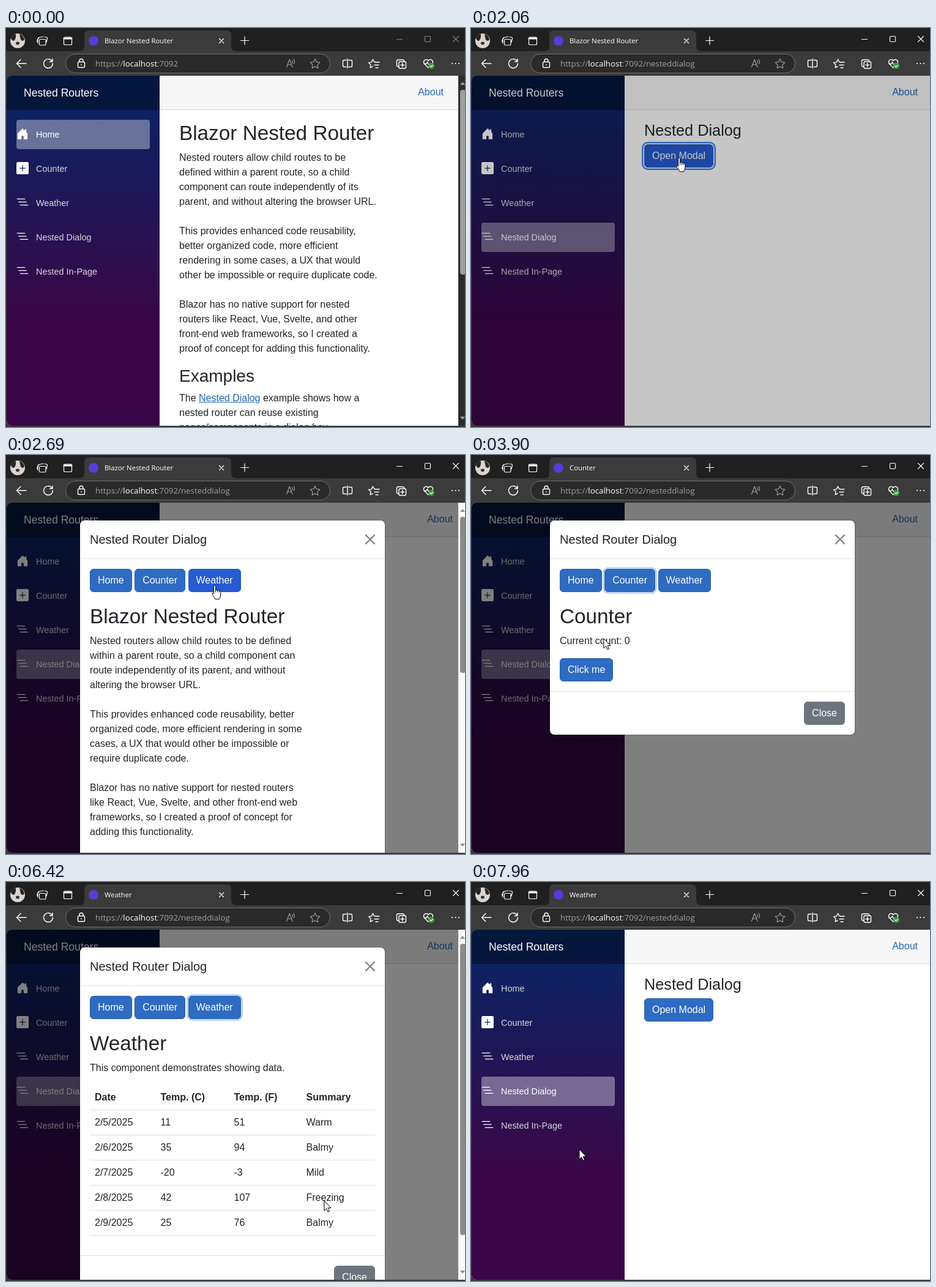
Write an HTML page that moves like this. It is 750 by 652 pixels and loops after 8 s.

```html
<!DOCTYPE html>
<html lang="en">
<head>
<meta charset="utf-8">
<title>Nested router demo</title>
<style>
* { box-sizing: border-box; }
html, body { margin: 0; width: 100%; height: 100%; overflow: hidden; background: #383838; }
body { position: relative; font: 16px/24px "Liberation Sans", Arial, sans-serif; color: #212529; }
[hidden] { display: none !important; }
h1, h2, h3, p { margin: 0; font-weight: 400; }
h1 { font-size: 33.3px; line-height: 1.2; margin-bottom: 8px; }
h2 { font-size: 28px; line-height: 1.2; margin: 16px 0 8px; }
h3 { font-size: 25.3px; line-height: 1.2; margin-bottom: 8px; }
p { white-space: pre; margin-bottom: 16px; }
a { color: #2265b2; }
#chrome { position: absolute; left: 0; top: 0; font-family: "Open Sans", "Noto Sans", sans-serif; }
#page { position: absolute; left: 1px; top: 78px; width: 753px; height: 572px;
  background: #fff; border-radius: 8px 0 0 8px; overflow: hidden; }
#page > * { position: absolute; }

#side { left: 0; top: 0; width: 250px; height: 572px; background: linear-gradient(#052767, #3a0647 70%); }
.brand { height: 56px; padding-left: 28px; line-height: 56px; font-size: 17.6px; color: #fff;
  background: rgba(0,0,0,.4); margin-bottom: 16px; }
.nav { position: relative; width: 218px; height: 48px; margin: 0 16px 8px; padding-left: 32px; border-radius: 4px;
  font-size: 14.4px; line-height: 48px; color: #d7d7d7; }
.nav svg { position: absolute; left: 0; top: 13px; }
.nav.active { background: rgba(255,255,255,.37); color: #fff; }
.nav.lit { color: #fff; }
.nav.hover { background: rgba(255,255,255,.1); }
#top { left: 250px; right: 0; top: 0; height: 56px; background: #f7f7f7; border-bottom: 1px solid #d6d5d5; }
#about { position: absolute; right: 24px; top: 15px; color: #2265b2; }
.main { left: 282px; top: 73.6px; }

.btn { display: inline-block; height: 38px; padding: 6px 12px; border: 1px solid #2660ac; border-radius: 6px;
  background: #2e6bc2; color: #fff; vertical-align: middle; }
.btn.hover { background: #275bd2; border-color: #2456c6; }
.btn.grey { background: #6c757d; border-color: #6c757d; }
.btn.grey.hover { background: #5c636a; border-color: #565e64; }
.btn.focus { box-shadow: 0 0 0 1.6px #fff, 0 0 0 4px #3c86ee; }
#modal .row .focus, #click.focus { box-shadow: 0 0 0 1px #e6f0fc, 0 0 0 2.6px #a5c6f2; }

#backdrop { inset: 0; background: #000; }
#modal { inset: 0; }
#dialog { position: absolute; top: 28px; width: 500px; background: #fff; background-clip: padding-box;
  border: 1px solid rgba(0,0,0,.175); border-radius: 8px; }
.head { position: relative; height: 63px; padding: 16px; border-bottom: 1px solid #dee2e6; font-size: 20px; line-height: 30px; }
.head svg { position: absolute; right: 16px; top: 23px; }
.body { padding: 16px; }
.row { height: 38px; margin-bottom: 20px; white-space: nowrap; }
.foot { height: 71px; padding: 16px; border-top: 1px solid #dee2e6; text-align: right; }
.line { display: grid; grid-template-columns: 107.5px 120px 118px 1fr; height: 41px; padding: 8px; border-bottom: 1px solid #dee2e6; }
.line:first-child { font-weight: 700; }
.table { margin-bottom: 16px; }

.bar { position: absolute; left: 738px; top: 0; width: 15px; height: 572px; background: #fafafa; color: #8b8b8b; }
.bar.dark { background: #2c2c2c; color: #9f9f9f; }
.bar i { position: absolute; left: 3px; top: 23px; width: 9px; border-radius: 4px; background: currentColor; }
.bar::before, .bar::after { content: ""; position: absolute; left: 3px; top: 10px; border: 4.5px solid transparent;
  border-top: 0; border-bottom: 5px solid currentColor; }
.bar::after { top: 557px; transform: scaleY(-1); }
#status { left: 0; bottom: 0; height: 21px; width: 200px; padding-left: 5px; background: #1f1f1f; color: #fff;
  border-radius: 0 4px 0 0; font: 11.45px/20px "Open Sans", "Noto Sans", sans-serif; }
#pointer { position: absolute; left: 0; top: 0; overflow: visible; }
</style>
</head>
<body>
<svg id="chrome" width="750" height="78" fill="none" stroke="#fff" stroke-width="1.2" stroke-linecap="round" stroke-linejoin="round">
  <g stroke="none">
    <path fill="#202020" d="M0 0H750V38H0Z"/>
    <path fill="#3b3b3b" d="M0 38H120Q128 38 128 30V12Q128 4 136 4H360Q368 4 368 12V30Q368 38 376 38H750V78H0Z"/>
    <circle cx="19" cy="21" r="12" fill="#d9d4d0"/>
    <path fill="#2b2323" d="M8 16Q10 10 16 10Q17 17 13 21Q9 21 8 16ZM22 10Q29 12 30 19Q27 23 24 19Z"/>
    <ellipse cx="19" cy="25" rx="3" ry="2.4" fill="#3a3030"/>
    <circle cx="143" cy="21" r="8" fill="#5a3bd6"/>
  </g>
  <rect x="97.500" y="42.500" width="432" height="31" rx="15.500" fill="#2a2a2a" stroke="#707070" stroke-width="1"/>
  <path d="M56 18.500h7.500a1.500 1.500 0 0 1 1.500 1.500v6.500a1.500 1.500 0 0 1-1.500 1.500H56a1.500 1.500 0 0 1-1.500-1.500V20a1.500 1.500 0 0 1 1.500-1.500ZM52 25V18q0-2 2-2.500l7-1.500M66 23l1.500-6q.3-1.500-1.200-2L63 14.500M51 22.500q-.5-4 3-6.500"/>
  <rect x="94.500" y="15" width="13" height="12.500" rx="2"/><path d="M95 17H107" stroke-width="3"/>
  <path d="M348.500 17.500l7 7m0-7l-7 7M383.500 20.500h13M390 14v13"/>
  <g id="caption" stroke-width="1.1">
    <path d="M638.500 18.500h9M730.500 13.500l9 9m0-9l-9 9"/><rect x="684.500" y="13.500" width="9" height="9" rx="1.500"/>
  </g>
  <g stroke-width="1.4">
    <path d="M33 58H18m6-6.500l-6.500 6.500 6.500 6.500M75.500 54.500A7.400 7.400 0 1 0 76.400 58M76 50.500v4.500h-4.500"/>
    <rect x="117.500" y="55.500" width="11" height="9" rx="1.500"/><path d="M120 55v-1.500a3 3 0 0 1 6 0V55M123 59.500v1"/>
    <g stroke="#a5a5a5" stroke-width="1.100"><path d="M458.500 64l4.800-12.500 4.800 12.500M460 60h6.500M467.500 53q1.500 2 .5 4.500M470 51q2.500 3.500 .5 7.500"/>
    <path id="star" d="M505 50.500l2.400 5 5.400.8-3.900 3.800.9 5.400-4.800-2.500-4.800 2.500.9-5.400-3.900-3.800 5.400-.8Z"/></g>
    <path d="M556 52.500h-3.500q-2 0-2 2v7q0 2 2 2H556M560 52.500h3.500q2 0 2 2v7q0 2-2 2H560M558 50.500v15"/>
    <path d="M603 55.500l-1.500-.2-2-4-2.200 4.600-4.800.7 3.500 3.400-.8 4.900 4-2.100M603 56h7M602 60.500h7M604 65h4"/>
    <path d="M642 63h-1.500q-2 0-2-2v-7q0-2 2-2h8q2 0 2 2v.5"/><rect x="642" y="55" width="11.500" height="11" rx="2"/>
    <path d="M647.800 57.500v6m-3-3h6"/>
    <path d="M690 65l-6.500-6.500q-2-3 0-5.500 3.500-3 6.500.5 3-3.500 6.500-.5 2 2.500 0 5.500ZM683 58.500h4l1.500-3 2.500 5 1.500-2h4"/>
  </g>
  <circle cx="695" cy="62" r="5" fill="#3f9a45" stroke="none"/><path d="M692.800 62l1.700 1.700 3-3"/>
  <path d="M729 58h.01M734.500 58h.01M740 58h.01" stroke-width="2.200"/>
  <text id="title" x="161" y="25" font-size="11.300" fill="#fff" stroke="none"></text>
  <text x="146" y="63" font-size="13.300" fill="#a0a0a0" stroke="none">https://<tspan fill="#fff">localhost</tspan>:7092<tspan id="path">/nesteddialog</tspan></text>
</svg>

<div id="page">
  <div id="side"><div class="brand">Nested Routers</div></div>
  <div id="top"><span id="about">About</span></div>
  <div class="main" id="homePage"><h1>Blazor Nested Router</h1><p>Nested routers allow child routes to be
defined within a parent route, so a child
component can route independently of its
parent, and without altering the browser URL.

This provides enhanced code reusability,
better organized code, more efficient
rendering in some cases, a UX that would
other be impossible or require duplicate code.

Blazor has no native support for nested
routers like React, Vue, Svelte, and other
front-end web frameworks, so I created a
proof of concept for adding this functionality.</p><h2>Examples</h2><p>The <a style="text-decoration:underline">Nested Dialog</a> example shows how a
nested router can reuse existing
pages/components in a dialog box.</p></div>
  <div class="main" id="dialogPage"><h3>Nested Dialog</h3><span class="btn" id="open">Open Modal</span></div>
  <div class="bar dark" id="pageBar"><i style="height:302px"></i></div>
  <div id="backdrop"></div>
  <div id="modal">
    <div id="dialog">
      <div class="head">Nested Router Dialog<svg width="16" height="16"><path d="M1 1L15 15M15 1L1 15" stroke="#7d7d7d" stroke-width="2.200" stroke-linecap="round"/></svg></div>
      <div class="body">
        <div class="row"><span class="btn">Home</span> <span class="btn" id="counterBtn">Counter</span> <span class="btn" id="weatherBtn">Weather</span></div>
        <div id="homeView"><h1>Blazor Nested Router</h1><p>Nested routers allow child routes to be defined
within a parent route, so a child component can
route independently of its parent, and without
altering the browser URL.

This provides enhanced code reusability, better
organized code, more efficient rendering in some
cases, a UX that would other be impossible or
require duplicate code.

Blazor has no native support for nested routers
like React, Vue, Svelte, and other front-end web
frameworks, so I created a proof of concept for
adding this functionality.</p><h2>Examples</h2></div>
        <div id="counterView"><h1>Counter</h1><p>Current count: <span id="count"></span></p><span class="btn" id="click">Click me</span></div>
        <div id="weatherView"><h1>Weather</h1><p>This component demonstrates showing data.</p>
          <p id="loading" style="margin:0"><em>Loading...</em></p><div class="table" id="table"></div></div>
      </div>
      <div class="foot"><span class="btn grey" id="close">Close</span></div>
    </div>
    <div class="bar" id="modalBar"><i id="thumb"></i></div>
  </div>
  <div id="status">https://localhost:7092/nesteddialog</div>
</div>
<svg id="pointer" width="1" height="1">
  <circle id="ring" r="12" fill="#e6d200" opacity=".6"/>
  <g fill="#fff" stroke="#000" stroke-linejoin="round">
    <path id="arrow" d="M0 0V16L3.700 12.600 6.200 18.300 8.600 17.200 6.200 11.700H11.200Z"/>
    <g id="hand"><path d="M-1.500 1.500a1.500 1.500 0 0 1 3 0V8q1.500-1.500 3 .3 1.700-1 2.800.6 2.300-.5 2.500 1.500V15q0 4-2.300 7.500H1q-1.500-3.300-4-6-2-2.500-1-3.500 1.200-1 2.500.8Z"/><path d="M1.500 8v3.500M4.500 8.500v3M7.300 9v2.500" fill="none"/></g>
  </g>
</svg>

<script>
const $ = id => document.getElementById(id);
const show = (id, on) => { $(id).toggleAttribute("hidden", !on); };
const flag = (el, name, on) => el.classList.toggle(name, on);
const within = (t, a, b) => t >= a && t < b;
const ramp = (t, start, length) => Math.min(1, Math.max(0, (t - start) / length));
const easeOut = u => 1 - (1 - u) ** 1.7;
const smooth = u => u * u * (3 - 2 * u);

const icons = {
  home: '<path fill="#fff" d="M6.500 14.500V11a.5.5 0 0 1 .5-.5h2a.5.5 0 0 1 .5.5v3.500a.5.5 0 0 0 .5.5h4a.5.5 0 0 0 .5-.5v-7L13 5.800V2.500a.5.5 0 0 0-.5-.5h-1a.5.5 0 0 0-.5.5v1.300L8.350 1.150a.5.5 0 0 0-.7 0L1.500 7.500v7a.5.5 0 0 0 .5.5h4a.5.5 0 0 0 .5-.5Z"/>',
  plus: '<rect width="16" height="16" rx="2" fill="#fff"/><path d="M4.500 8h7M8 4.500v7" stroke="#22205a" stroke-linecap="round"/>',
  list: '<path d="M1 3.500h10M3 7.500h10M5 11.500h10" stroke="#fff" stroke-linecap="round"/>'
};
const links = [["Home", "home"], ["Counter", "plus"], ["Weather", "list"], ["Nested Dialog", "list"], ["Nested In-Page", "list"]];
$("side").innerHTML += links.map(([text, icon]) =>
  `<div class="nav"><svg width="20" height="20" viewBox="0 0 16 16">${icons[icon]}</svg>${text}</div>`).join("");
const navs = document.querySelectorAll(".nav");

const rows = ["Date|Temp. (C)|Temp. (F)|Summary", "2/5/2025|11|51|Warm", "2/6/2025|35|94|Balmy",
  "2/7/2025|-20|-3|Mild", "2/8/2025|42|107|Freezing", "2/9/2025|25|76|Balmy"];
$("table").innerHTML = rows.map(r =>
  `<div class="line">${r.split("|").map(c => `<span>${c}</span>`).join("")}</div>`).join("");

// pointer hotspot: time, x, y
const track = [[0, -30, 360], [69, -30, 360], [70, -5, 360], [230, -5, 360], [480, 58, 359], [1090, 58, 359],
  [1780, 340, 212], [2870, 341, 213], [3300, 262, 212], [3620, 262, 212], [4100, 190, 352], [4560, 190, 352],
  [5200, 354, 215], [5890, 354, 215], [6650, 566, 606], [6720, 566, 606], [7050, 584, 641], [7500, 584, 641],
  [7960, 177, 437], [8000, 177, 437]];
const clicks = [640, 1920, 3330, 4150, 4440, 5270, 7130];
const hovers = { open: [[1640, 2150]], weatherBtn: [[2400, 3040], [5040, 5970]],
  counterBtn: [[3070, 3740]], click: [[4000, 4680]], close: [[6980, 7420]] };
const focuses = { open: [1990, 2200], counterBtn: [3380, 4180], click: [4180, 5480],
  weatherBtn: [5290, 7150], close: [7150, 7600] };

function movePointer(t, hand) {
  const i = Math.max(1, track.findIndex(k => k[0] > t));
  const [a, b] = [track[i - 1], track[i]];
  const u = smooth(ramp(t, a[0], b[0] - a[0]));
  const [x, y] = [1, 2].map(n => a[n] + (b[n] - a[n]) * u);
  $("pointer").style.transform = `translate(${x}px,${y}px)`;
  const display = (id, on) => { $(id).style.display = on ? "" : "none"; };
  display("ring", clicks.some(c => within(t, c, c + 130)));
  display("hand", hand);
  display("arrow", !hand);
}

function draw(t) {
  const moved = t >= 700;
  $("caption").style.stroke = t < 640 ? "#858585" : "#fff";
  $("title").textContent = t < 3620 ? "Blazor Nested Router" : t < 5480 ? "Counter" : "Weather";
  $("path").style.display = moved ? "" : "none";
  show("homePage", !moved);
  show("pageBar", !moved);
  show("dialogPage", moved);
  $("about").style.right = moved ? "24px" : "39px";
  show("status", within(t, 770, 1290));

  flag(navs[0], "active", !moved);
  flag(navs[3], "active", moved);
  flag(navs[3], "lit", t >= 480);
  flag(navs[3], "hover", within(t, 640, 1220));

  let hand = within(t, 480, 1220);
  for (const id in hovers) {
    const on = hovers[id].some(([a, b]) => within(t, a, b));
    flag($(id), "hover", on);
    hand = hand || on;
  }
  for (const id in focuses) flag($(id), "focus", within(t, ...focuses[id]));

  // the backdrop fades in before the dialog and out after it
  $("backdrop").style.opacity = .5 * (ramp(t, 1994, 150) - ramp(t, 7570, 150));
  show("modal", within(t, 2150, 7570));
  $("modal").style.opacity = ramp(t, 2150, 150) - ramp(t, 7270, 150);
  const lift = 1 - easeOut(ramp(t, 2150, 300)) + easeOut(ramp(t, 7270, 300));
  $("dialog").style.transform = `translateY(${-50 * lift}px)`;

  const home = t < 3400, weather = t >= 5480, loaded = t >= 5890;
  show("homeView", home);
  show("counterView", !home && !weather);
  show("weatherView", weather);
  show("loading", !loaded);
  show("table", loaded);
  $("count").textContent = t < 4220 ? 0 : t < 4510 ? 1 : 2;
  const tall = home || loaded;
  $("dialog").style.left = tall ? "119px" : "127px";
  show("modalBar", tall);
  $("thumb").style.height = home ? "255px" : "476px";

  movePointer(t, hand);
}

function frame() {
  draw(performance.now() % 8000);
  requestAnimationFrame(frame);
}
frame();
</script>
</body>
</html>
```
